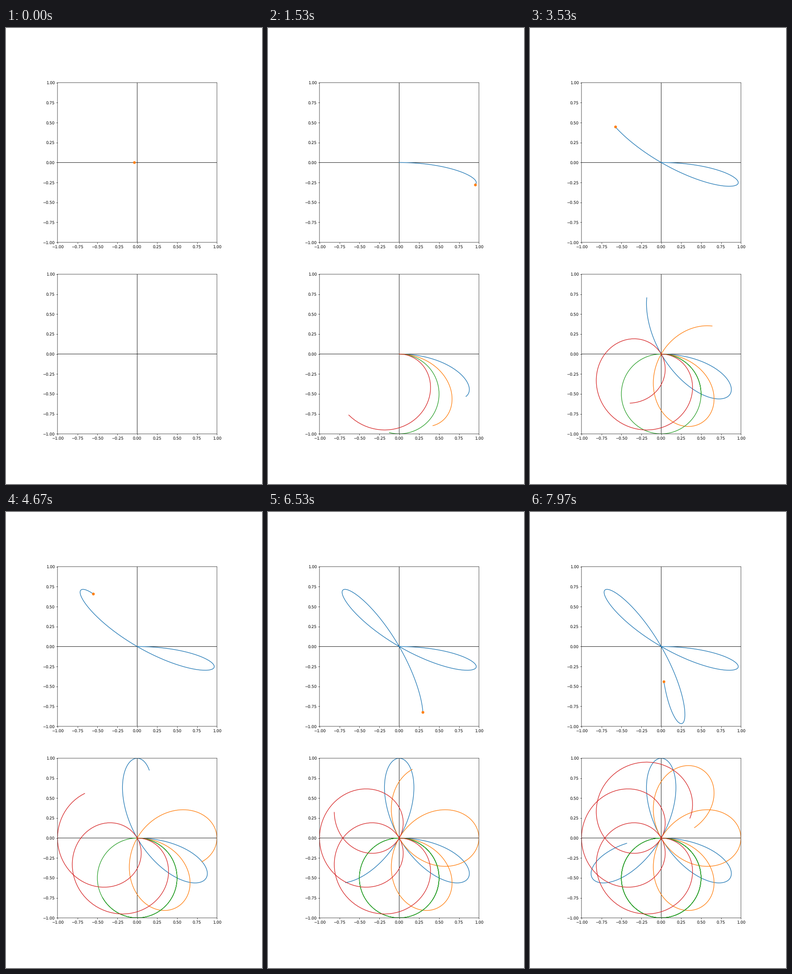
Write a matplotlib script that moves like this. It is 561 px wide and 998 px high and loops after 8000 ms.

```python
import numpy as np
import matplotlib.pyplot as plt
from matplotlib.animation import FuncAnimation

WIDTH, HEIGHT = 561, 998
DPI = HEIGHT / 16
LOOP_MS = 8000
TICK_MS = 25
SAMPLES = 1000

# Six full swings of the pendulum phase
phase = np.linspace(0, 12 * np.pi, SAMPLES, endpoint=False)


def swing(ratio):
    """Oscillation along a line that turns clockwise at `ratio` times the phase."""
    r = np.sin(phase)
    return r * np.cos(ratio * phase), -r * np.sin(ratio * phase)


def setup(ax):
    ax.set_aspect("equal")
    ax.set_xlim(-1, 1)
    ax.set_ylim(-1, 1)
    ax.axhline(0, color="black", lw=1)
    ax.axvline(0, color="black", lw=1)


# Smooth subpixel placement of lines and glyphs
plt.rcParams.update({
    "font.family": "DejaVu Sans",
    "path.snap": False,
    "text.hinting": "none",
})
fig, (top, bottom) = plt.subplots(2, 1, figsize=(WIDTH / DPI, HEIGHT / DPI),
                                  dpi=DPI)
setup(top)
setup(bottom)

paths = [swing(k / 6) for k in (1, 2, 4, 6, 8)]
lines = [top.plot([], [], color="C0")[0]]
lines += [bottom.plot([], [], color=f"C{i}")[0] for i in range(4)]
bob, = top.plot([], [], "o", color="C1")


def update(tick):
    # The pendulum advances 30 samples a second, at 40 ticks a second
    n = (3 * tick + 2) // 4
    for line, (x, y) in zip(lines, paths):
        line.set_data(x[:n], y[:n])
    # With an empty trail the bob sits on the last sample of the cycle
    x, y = paths[0]
    bob.set_data([x[n - 1]], [y[n - 1]])
    return [*lines, bob]


anim = FuncAnimation(fig, update, frames=LOOP_MS // TICK_MS, interval=TICK_MS,
                     init_func=lambda: update(0), repeat=True, repeat_delay=0)
plt.show()
```
